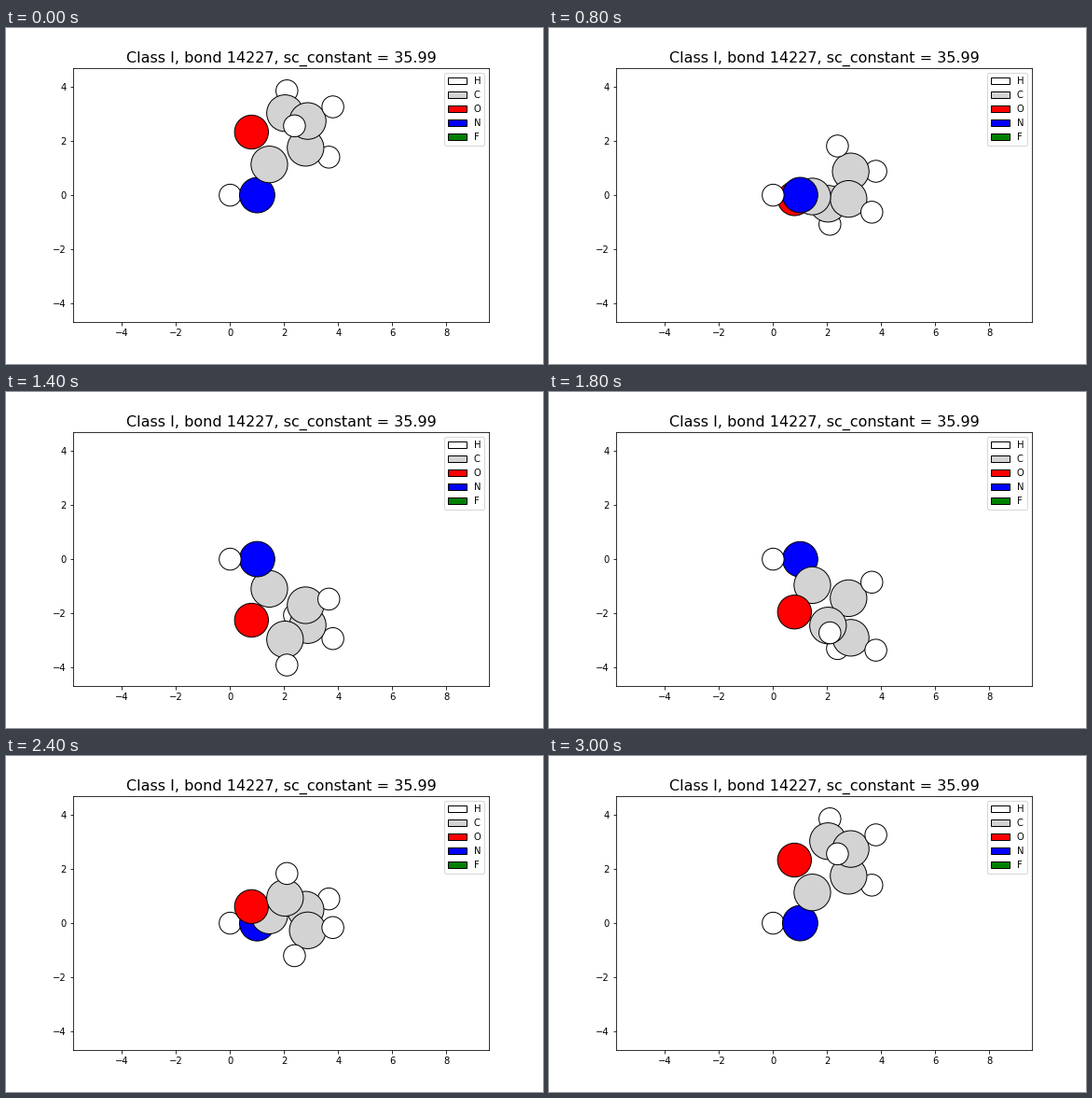
Animation of 576 by 360 pixels, one loop 3.2 s. Source, as a matplotlib script:

```python
import numpy as np
import matplotlib.pyplot as plt
from matplotlib.animation import FuncAnimation
from matplotlib.patches import Patch

FRAMES = 16
COLORS = {"H": "white", "C": "lightgray", "O": "red", "N": "blue", "F": "green"}
RADII = {"H": 25, "C": 70, "O": 60, "N": 65}

# element, x, y, z
ATOMS = [
    ("H", 0.00, 0.000, 0.000),
    ("N", 1.00, 0.000, 0.005),
    ("C", 1.45, 1.135, 0.070),
    ("O", 0.79, 2.330, 0.115),
    ("C", 2.03, 3.030, 0.000),
    ("C", 2.79, 1.750, 0.045),
    ("C", 2.87, 2.740, 1.170),
    ("H", 2.10, 3.855, -0.677),
    ("H", 3.80, 3.262, 1.230),
    ("H", 3.65, 1.405, -0.485),
    ("H", 2.38, 2.560, 2.095),
]
x, y, z = np.array([atom[1:] for atom in ATOMS]).T
sizes = np.array([22 * RADII[atom[0]] for atom in ATOMS])
faces = np.array([COLORS[atom[0]] for atom in ATOMS])

fig, ax = plt.subplots(figsize=(8, 5), dpi=72)
fig.subplots_adjust(left=0.125, right=0.9, bottom=0.125, top=0.88)
ax.set_xlim(-5.807, 9.586)
ax.set_ylim(-4.686, 4.686)
ax.set_xticks(range(-4, 9, 2))
ax.set_yticks(range(-4, 5, 2))
ax.set_title("Class I, bond 14227, sc_constant = 35.99", fontsize=16)
ax.legend(
    handles=[Patch(facecolor=c, edgecolor="black", label=e) for e, c in COLORS.items()],
    loc="upper right",
)
balls = ax.scatter(x, y, s=sizes, c=faces, edgecolors="black", linewidths=1)


def update(i):
    """Turn the molecule about the x axis and paint it back to front."""
    angle = 2 * np.pi * i / (FRAMES - 1)
    c, s = np.cos(angle), np.sin(angle)
    height = y * c + z * s
    order = np.argsort(z * c - y * s, kind="stable")
    balls.set_offsets(np.column_stack([x, height])[order])
    balls.set_sizes(sizes[order], dpi=fig.dpi)
    balls.set_facecolors(faces[order])
    return (balls,)


anim = FuncAnimation(fig, update, frames=FRAMES, interval=200, repeat=True, repeat_delay=0)
plt.show()
```
